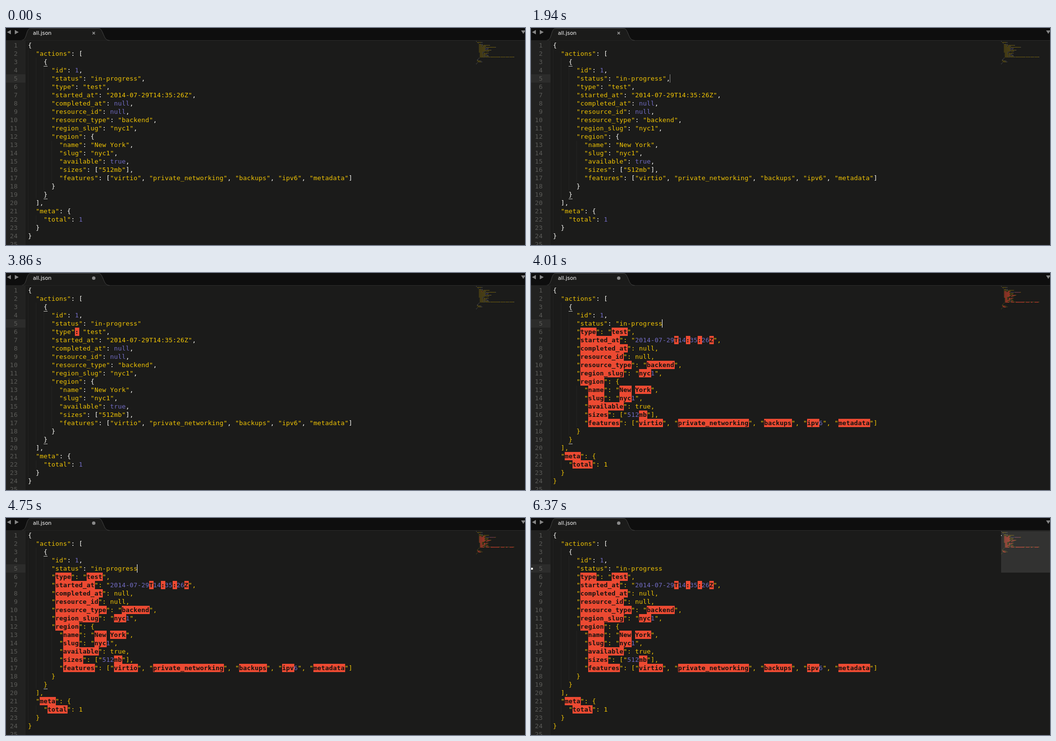
Recreate the animation shown at these times as an HTML page with a canvas. Size 1062x445 px, loop 6510 ms.

```html
<!DOCTYPE html>
<html lang="en">
<head>
<meta charset="utf-8">
<title>JSON editor</title>
<style>
  html, body { margin: 0; width: 100%; height: 100%; overflow: hidden; background: #1b1b1a; }
  #stage { position: relative; width: 100%; height: 100%; overflow: hidden; contain: strict; }
  #stage > *, .guide { position: absolute; }
  pre {
    margin: 0; top: 27px;
    font: 13px/17px "DejaVu Sans Mono", monospace;
    letter-spacing: calc(8px - 1ch);
    font-variant-ligatures: none;
  }
  #gutter { left: 0; top: 25px; width: 40px; height: 420px; background: #222221; }
  #row { left: 0; top: 95px; width: 40px; height: 17px; background: #2c2c2b; }
  #numbers { left: 0; width: 24px; text-align: right; color: #5a5a57; }
  #guides { left: 0; top: 0; }
  #code { left: 45px; color: #fcfcf8; }
  .str { color: #f0c404; }
  .num { color: #716bc2; }
  .bad {
    display: inline-block; height: 17px;
    background: #ec4a32; box-shadow: 1px 0 #ec4a32;
    color: #141210; font-weight: bold;
  }
  .guide { width: 1px; height: 17px; background: #232322; }
  .match { left: 77px; width: 8px; height: 1px; background: #c8c8c4; }
  #caret { top: 95px; width: 1px; height: 17px; background: #fff; }
  #mark { left: 0; top: 102px; width: 4px; height: 4px; background: #f4f4f0; }
  #map { left: 962px; top: 27px; }
  #view { left: 962px; top: 27px; width: 100px; height: 85px; background: rgba(255, 255, 255, .1); }
  #viewMark { left: 962px; top: 35px; width: 1px; height: 2px; background: #fff; }
  #bar { left: 0; top: 0; }
  #title { left: 55px; top: 3px; font: 10.8px/16px "DejaVu Sans", sans-serif; color: #fff; }
</style>
</head>
<body>
<div id="stage">
  <svg id="bar" width="1062" height="27" viewBox="0 0 1062 27">
    <rect width="1062" height="25" fill="#0e0e0e"/>
    <path d="M0 25.5H1062" stroke="#2d2d2c"/>
    <path d="M31 25.5C39 25 40 18 43 9C45 3 47 .5 52 .5H188C194 .5 195 4 198 10C202 19 203 25 212 25.500" fill="#1b1b1a" stroke="#444443"/>
    <path d="M10 4V13L2 8.5ZM18 4V13L26 8.5ZM1054 5H1063L1058.500 12Z" fill="#858585"/>
    <path id="close" d="M177 8L182 13M182 8L177 13" stroke="#a0a0a0" stroke-width="1.400"/>
    <circle id="dirty" cx="179.500" cy="10.500" r="3.500" fill="#8a8a8a"/>
  </svg>
  <div id="title">all.json</div>
  <div id="gutter"></div>
  <div id="row"></div>
  <pre id="numbers"></pre>
  <div id="guides"></div>
  <pre id="code"></pre>
  <div class="match" style="top:78px"></div>
  <div class="match" style="top:350px"></div>
  <div id="caret"></div>
  <div id="mark"></div>
  <canvas id="map" width="100" height="50"></canvas>
  <div id="view"></div>
  <div id="viewMark"></div>
</div>
<script>
const LOOP = 6510, CHAR = 8, LINE = 17, LEFT = 45, TOP = 27;
const $ = id => document.getElementById(id);

const HEAD = `{
  "actions": [
    {
      "id": 1,
      "status": "in-progress`;
const REST = `
      "type": "test",
      "started_at": "2014-07-29T14:35:26Z",
      "completed_at": null,
      "resource_id": null,
      "resource_type": "backend",
      "region_slug": "nyc1",
      "region": {
        "name": "New York",
        "slug": "nyc1",
        "available": true,
        "sizes": ["512mb"],
        "features": ["virtio", "private_networking", "backups", "ipv6", "metadata"]
      }
    }
  ],
  "meta": {
    "total": 1
  }
}`;

// time, end of the status line, caret opacity, bracket underline
const STEPS = [
  [0, '",', 0, 1],
  [440, '",', .45, 1],
  [590, '",', 1, 1],
  [740, '",', .75, 1],
  [890, '",', .35, 1],
  [1490, '",', .7, 1],
  [1790, '",', 1, 1],
  [1940, '",', .5, 1],
  [2080, '",,', 1, 1],
  [2380, '",,,', 1, 1],
  [2680, '",,,,', 1, 1],
  [2980, '",,,', 1, 1],
  [3120, '",,', 1, 1],
  [3270, '"', 1, 1],
  [3710, '"', .5, 1],
  [3860, '"', 0, 1],
  [4010, '', 1, 1],
  [4300, '"', 1, 0],
  [4750, '', 1, 1],
  [5190, '', .5, 1],
  [5340, '', 0, 1],
  [5780, '', .5, 0],
  [5930, '', 1, 0],
  [6220, '', .5, 0],
  [6370, '', 0, 0]
];
const EDIT_AT = 2080, MARK_AT = 5780, VIEW_AT = 6370;

// Splits JSON, valid or not, into [text, class] pairs.
function tokenize(text) {
  let last = '', before = '';
  return text.match(/"[^"]*"?|-?\d+|\w+?(?=\d|\W|$)|\s+|[^]/g).map(part => {
    if (/^\s/.test(part)) return [part, ''];
    let kind = '';
    if (part[0] === '"') kind = 'str';
    else if (/^-?\d|^(null|true)$/.test(part)) kind = 'num';
    else if (/^\w/.test(part)) kind = 'bad';
    else if (part === ',' && last === ',') kind = 'bad';
    else if (part === ':' && !(last === 'str' && /^[{,]$/.test(before))) kind = 'bad';
    before = last;
    last = part === ',' ? ',' : kind || part;
    return [part, kind];
  });
}

const INK = {
  '': 'rgba(248,248,242,.4)', str: 'rgba(232,191,6,.45)',
  num: 'rgba(108,102,185,.5)', bad: 'rgba(236,74,50,.8)'
};
const pen = $('map').getContext('2d');

function drawMap(tokens) {
  const step = .94;
  let col = 0, line = 0;
  pen.clearRect(0, 0, 100, 50);
  for (const [part, kind] of tokens) {
    pen.fillStyle = INK[kind];
    for (const ch of part) {
      if (ch === '\n') { line++; col = 0; continue; }
      if (ch !== ' ') pen.fillRect(col * step, line * 2, step, kind === 'bad' ? 1.5 : 1);
      col++;
    }
  }
}

function drawCode(tail) {
  const tokens = tokenize(HEAD + tail + REST);
  $('code').replaceChildren(...tokens.map(([part, kind]) => {
    const span = document.createElement('span');
    span.className = kind;
    span.textContent = part;
    return span;
  }));
  drawMap(tokens);
  const col = (HEAD + tail).split('\n').pop().length;
  $('caret').style.left = LEFT - 1 + col * CHAR + 'px';
}

function drawGuides() {
  (HEAD + REST).split('\n').forEach((text, i) => {
    for (let col = 0; col < text.search(/\S/); col += 2) {
      const guide = document.createElement('div');
      guide.className = 'guide';
      guide.style.left = LEFT + col * CHAR + 'px';
      guide.style.top = TOP + i * LINE + 'px';
      $('guides').append(guide);
    }
  });
}

const show = (el, on) => { el.style.visibility = on ? 'visible' : 'hidden'; };
let current, shownTail;

function render(now) {
  const t = now % LOOP;
  const step = STEPS.findLast(s => s[0] <= t);
  if (step === current) return;
  current = step;
  const [time, tail, caret, match] = step;
  if (tail !== shownTail) drawCode(shownTail = tail);
  $('caret').style.opacity = caret;
  document.querySelectorAll('.match').forEach(el => show(el, match));
  show($('close'), time < EDIT_AT);
  show($('dirty'), time >= EDIT_AT);
  show($('mark'), time >= MARK_AT);
  show($('view'), time >= VIEW_AT);
  show($('viewMark'), time >= VIEW_AT);
}

function tick() {
  render(performance.now());
  requestAnimationFrame(tick);
}

$('numbers').textContent = Array.from({ length: 25 }, (_, i) => i + 1).join('\n');
drawGuides();
tick();
</script>
</body>
</html>
```
